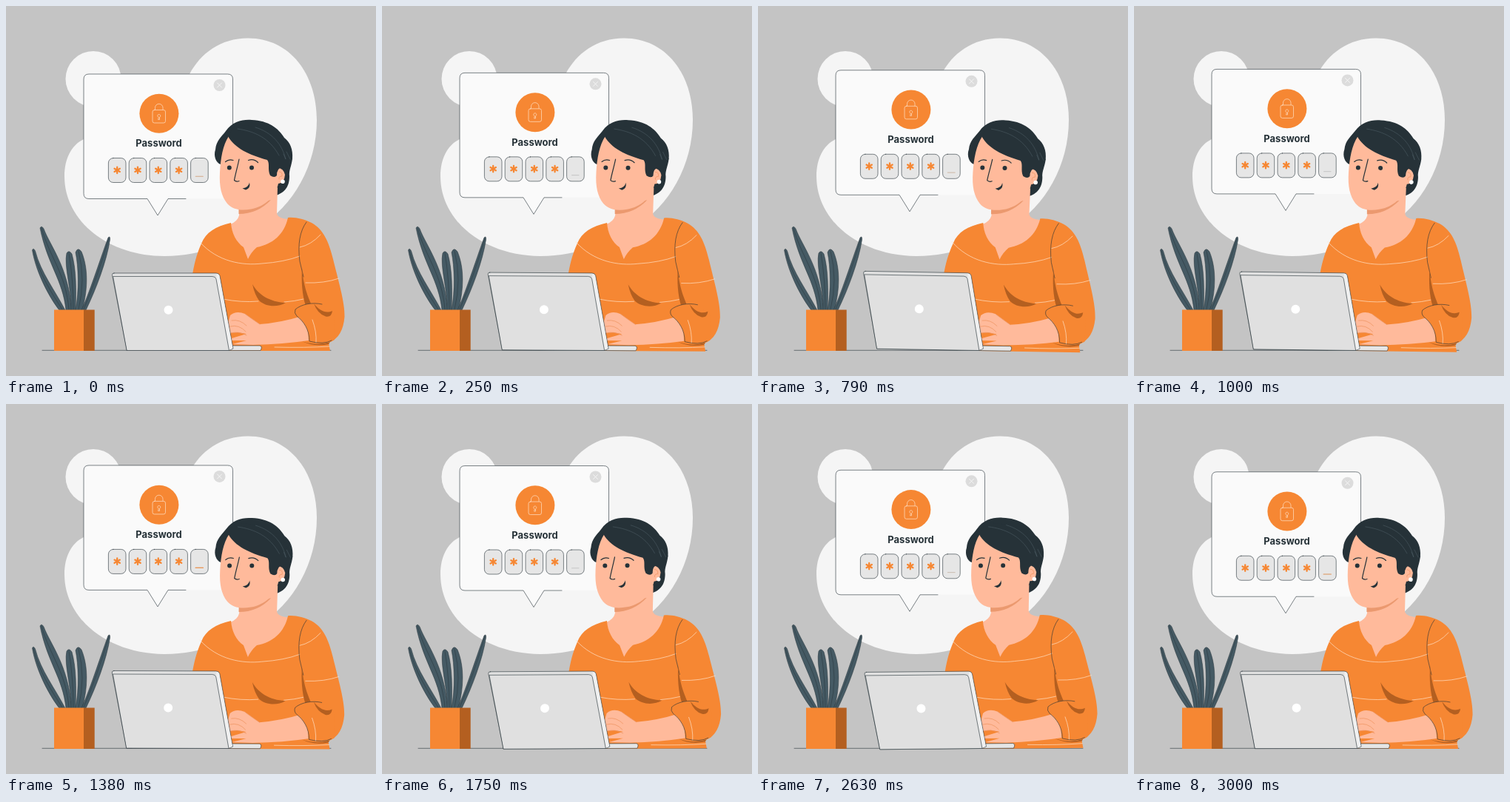
An HTML page for the animation above (3.04 s loop, 500 by 500 pixels).

```html
<!DOCTYPE html>
<html lang="en">
<head>
<meta charset="utf-8">
<title>Password</title>
<style>
  html, body { margin: 0; width: 100%; height: 100%; overflow: hidden; background: #c4c4c4; }
  svg { display: block; width: 100vw; height: 100vh; }
  path, line, rect { stroke-linecap: round; stroke-linejoin: round; }
  .o { fill: #f68733; }
  .d { fill: #263238; }
  .skin { fill: #ffba9b; }
  .shade { fill: #b45f20; }
  .ink { fill: none; stroke: #263238; stroke-width: .6; }
  .pale { fill: none; stroke: #ffe1c7; stroke-width: .7; }
  .leaf { fill: #455a64; stroke: #263238; stroke-width: .5; }
  .vein { fill: none; stroke: #263238; stroke-width: .5; }
</style>
</head>
<body>
<svg viewBox="0 0 500 500">
  <!-- backdrop -->
  <g fill="#f5f5f5">
    <circle cx="118" cy="98.500" r="37.500"/>
    <path d="M105 180C88 188 79 207 79 230C79 292 140 338 214 338C268 338 305 318 342 298C388 271 420 215 420 154C420 92 384 43.500 327 43.500C290 43.500 263 64 248 92L180 150Z"/>
  </g>
  <line class="ink" x1="49" y1="465.300" x2="439" y2="465.300"/>

  <!-- plant -->
  <path class="leaf" d="M72 411C60 396 41 362 35.500 330Q37 326 39.500 331C47 360 66 384 80 411Z"/>
  <path class="leaf" d="M81 411C77 370 56 350 46 300Q48 296 51 301C60 325 84 352 89 411Z"/>
  <path class="leaf" d="M88 411C89 384 78 352 82 334Q85 329 89 335C95 356 95 384 94 411Z"/>
  <path class="leaf" d="M94 411C99 384 98 352 94 333Q97 325 102 332C112 356 110 386 103 411Z"/>
  <path class="leaf" d="M102 411C112 390 126 346 138 313Q141 310 140.500 316C136 345 122 382 108 411Z"/>
  <path class="vein" d="M37 330C44 361 63 390 76 410M48 300C58 338 81 361 85 410M85 334Q91 370 91 410M98 331Q108 370 98 410M139 314Q124 365 105 410"/>
  <path class="o" d="M65 410.500h40.500v55.500h-40.500z"/>
  <path class="shade" d="M105 410.500h14.700v55.500h-14.700z"/>

  <!-- password bubble -->
  <g id="bubble">
    <path fill="#fafafa" d="M112 92H299.500Q306.500 92 306.500 99V260.500H219L205 283L191 260.500H112Q105 260.500 105 253.500V99Q105 92 112 92Z"/>
    <path class="ink" d="M306.500 225V99Q306.500 92 299.500 92H112Q105 92 105 99V253.500Q105 260.500 112 260.500H191L205 283L219 260.500H243"/>
    <circle cx="288.500" cy="107" r="8" fill="#dcdcdc"/>
    <path d="M285.500 104l6 6m0-6l-6 6" stroke="#fafafa" stroke-width=".8"/>
    <circle class="o" cx="206.900" cy="145.300" r="26.500"/>
    <g class="pale">
      <rect x="198" y="140.500" width="17.500" height="17.500" rx="2.500"/>
      <path d="M201.500 140V137.500A5.200 5.200 0 0 1 212 137.500V140M206 150.300A2 2 0 1 1 207.500 150.300V153.500H206Z"/>
    </g>
    <text x="206.500" y="190.300" text-anchor="middle" font-family="Inter, sans-serif" font-weight="700" font-size="13" fill="#263238">Password</text>
    <g id="cells"></g>
    <line x1="256.500" x2="266" y1="230.300" y2="230.300" stroke="#bdbdbd" stroke-width=".8"/>
    <line id="caret" x1="256" x2="266.500" y1="230.300" y2="230.300" stroke="#f68733" stroke-width="1.100"/>
  </g>

  <!-- woman and laptop -->
  <g id="sway">
    <path class="d" d="M290 214C284 212 280 203 283 194C284 182 291 177 297 169C306 156 320 153 332 154C355 155 368 165 376 178C384 184 388 194 387 206C386 216 382 222 383 230C383 240 380 251 365 256L340 240Z"/>
    <path class="skin" d="M315 268V283Q313 291 303 295L311 322L327 342L345 328L372 312L382 288Q367 287 366 280L367 245Z"/>
    <path fill="#eb996f" d="M314.500 273V281Q340 281 358 262Z"/>
    <path class="skin" d="M301 176C293 188 290 206 289 225C288 244 291 257 299 267C306 275 317 277 331 274.500C350 271 364 258 368 240Q376 240 377 228Q375 219 367 219L352 204Z"/>
    <path class="d" d="M300 176C309 192 328 201 353 208C357 213 353 221 357 229Q363 233 366 229Q366 219 373 218L380 221L387 206L372 180L345 164L310 160Z"/>
    <path fill="none" stroke="#52636b" stroke-width=".5" d="M313 166C335 169 356 178 369 202M337 164C360 171 373 187 378 207L375 200M384 207L379 197"/>
    <path fill="none" stroke="#ed935f" stroke-width=".7" d="M369 224Q374 224 373 230Q368 230 369 234"/>
    <circle cx="374" cy="237.200" r="2.800" fill="#fff"/>

    <g class="d">
      <circle cx="301.800" cy="218.500" r="3"/>
      <circle cx="332" cy="218.500" r="3"/>
      <path d="M319.500 246.500Q328 245 329 238.500Q331 246 324 248.500Z"/>
    </g>
    <path class="ink" style="stroke-width:1.2" d="M296.500 210.500Q301 206.500 307 208.500M327.500 208.500Q335 206 340.500 211.500M315 207C313 217 310 227 308.500 235.500Q311 238 315 236.500"/>

    <path class="o" d="M304 293C283 298 270 306 264 321C257 337 254 350 251.500 366L300 466H438L436 455C450 450 456 437 457.500 420C458 400 449 371 442 342C436 318 429 302 413 293C403 288 391 285 381 286C376 309 360 322 339 326Q331 333 327 342L321 326C311 319 305 307 304 293Z"/>
    <path class="pale" d="M262 319C286 346 320 351 346 348Q376 346 397 338M397 326Q412 323 425 309M405 374Q430 375 450 368M293 396Q318 401 341 399M376 400Q390 399 402 396M363 461Q405 462 437 460"/>
    <path class="ink" d="M406 292C397 304 394 322 397 345L402 366"/>
    <g class="shade">
      <path d="M333 376C341 390 356 400 378 401C366 408 350 406 342 398Q336 390 333 376Z"/>
      <path d="M400 354C402 378 407 390 412 402L405 405C400 390 399 371 400 354Z"/>
      <path d="M400 453Q420 460 438 454L436 457Q416 461 400 453Z"/>
    </g>
    <path class="skin" d="M400 419Q371 428 343 430L323 416Q311 411 303 418L299 432L301 457L334 458Q375 457 409 452Q409 432 400 419Z"/>
    <path class="o" d="M302 442L313 441L325 443L305 449ZM304 452L325 452L306 457Z"/>
    <path fill="none" stroke="#ed935f" stroke-width=".7" d="M305 425Q316 423 325 432M303 433Q315 430 324 440M304 442Q315 439 325 445M323 416Q335 425 343 430"/>
    <path class="o" d="M391 410C401 402 417 399 430 405L445 418L444 451C434 457 421 457 410 453C410 437 402 426 393 419Q389 415 391 410Z"/>
    <path class="pale" d="M414 424Q420 440 419 455"/>
    <path class="ink" d="M427 403C414 400 399 403 391 410Q389 415 393 419C402 426 410 437 410 453Q429 458 440 452"/>
    <path class="shade" d="M416 402C424 412 432 416 441 412Q440 421 432 419.500Q421 416 416 402Z"/>

    <path fill="#e6e6e6" stroke="#263238" stroke-width=".6" d="M298 459H343Q347 460 344 465.500H298Z"/>
    <path fill="#e0e0e0" stroke="#263238" stroke-width=".6" d="M146 361H284Q288 361 289 364.500L307 463L301 465.500H163.500L143.500 363.500Q143 361 146 361Z"/>
    <path fill="#f0f0f0" d="M284.500 362Q287.500 362 288.300 365L306.300 462.600L302 464.700L284.500 369Z"/>
    <path fill="#e0e0e0" stroke="#263238" stroke-width=".6" d="M145 365.500H279Q283 365.500 284 369L301.500 465.500H163.500Z"/>
    <circle cx="219.500" cy="410.700" r="6" fill="#fff"/>
  </g>
</svg>
<script>
  const LOOP = 3040;
  const $ = id => document.getElementById(id);

  let cells = '';
  for (let i = 0; i < 5; i++) {
    const x = 150.2 + i * 27.8;
    cells += `<rect x="${x - 11.8}" y="205.500" width="23.600" height="33" rx="6.500" fill="#e6e6e6" stroke="#263238" stroke-width=".6"/>`;
    if (i < 4) {
      for (const angle of [0, 60, 120]) {
        cells += `<line x1="${x}" x2="${x}" y1="217.600" y2="226" stroke="#f68733" stroke-width="2.300" transform="rotate(${angle} ${x} 221.800)"/>`;
      }
    }
  }
  $('cells').innerHTML = cells;

  // Triangle wave: 0 at whole periods, 1 halfway
  const tri = p => 1 - Math.abs(1 - 2 * (p % 1));

  function draw(now) {
    const t = now % LOOP, p = t / LOOP;
    $('bubble').setAttribute('transform', `translate(0 ${-10 * tri(p)})`);
    $('sway').setAttribute('transform', `rotate(${2 * tri(p + .25) - 1} 300 309)`);
    const blink = .35 + .9 * Math.cos(2 * Math.PI * (t - 575) / 760);
    $('caret').setAttribute('opacity', Math.min(1, Math.max(0, blink)));
    requestAnimationFrame(draw);
  }
  draw(0);
</script>
</body>
</html>
```
